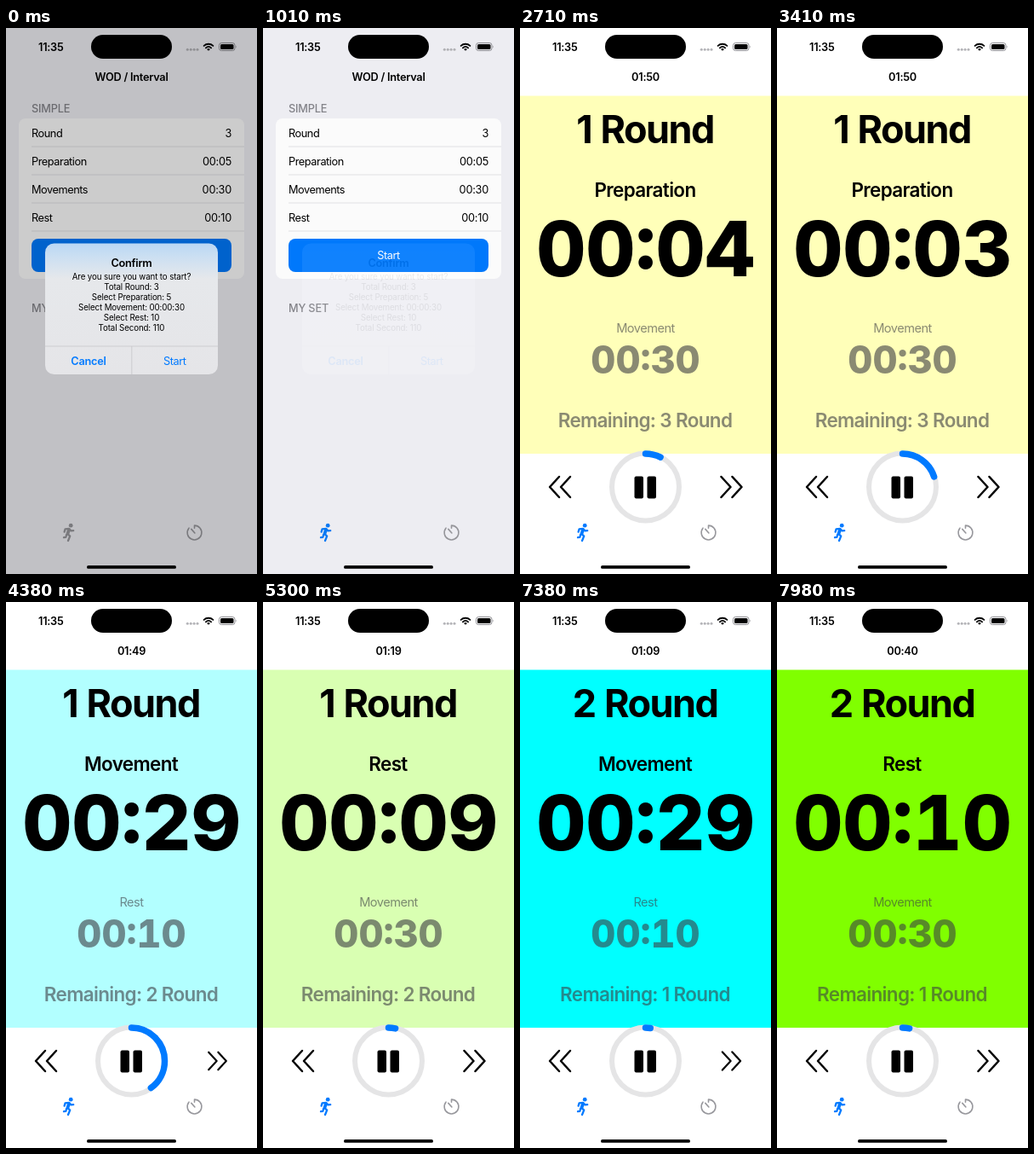
These frames come from a looping animation (295 px wide and 640 px high, 8 s). An HTML page:

```html
<!DOCTYPE html>
<html lang="en">
<head>
<meta charset="utf-8">
<title>Interval timer</title>
<style>
  html, body { margin: 0; width: 100%; height: 100%; overflow: hidden; background: #fff; }
  svg { display: block; width: 295px; height: 640px; }
  text { font-family: Inter, "Open Sans", sans-serif; font-optical-sizing: none; font-size: 12.76px; letter-spacing: -.035em; }
  .mid { text-anchor: middle; }
  .end { text-anchor: end; letter-spacing: -.02em; }
  .bold { font-weight: 600; letter-spacing: -.02em; }
  .head { fill: #85858b; font-weight: 500; letter-spacing: -.015em; }
  .note { font-size: 9.75px; letter-spacing: -.013em; }
  .round { font-size: 45px; font-weight: 700; letter-spacing: -.034em; word-spacing: .03em; }
  .phase { font-size: 22.5px; font-weight: 600; letter-spacing: -.03em; }
  .clock { font-size: 90px; font-weight: 800; letter-spacing: 0; font-variant-numeric: tabular-nums; font-variant-ligatures: no-contextual; }
  .next { font-size: 14.6px; letter-spacing: -.035em; }
  .small { font-size: 45px; }
  .soft { fill: #3c3c43; fill-opacity: .6; }
  .line { fill: none; stroke-linecap: round; stroke-linejoin: round; }
</style>
</head>
<body>
<svg viewBox="0 0 295 640">
  <defs>
    <linearGradient id="glass" x1="0" y1="0" x2="0" y2="1">
      <stop offset="0" stop-color="#b9d7f4"/>
      <stop offset=".1" stop-color="#cbdff2"/>
      <stop offset=".27" stop-color="#e6e8eb"/>
      <stop offset="1" stop-color="#e5e5e8"/>
    </linearGradient>
  </defs>

  <g id="setup">
    <rect width="295" height="640" fill="#f1f1f6"/>
    <text class="mid bold" x="147.5" y="61.5">WOD / Interval</text>
    <text class="head" x="30" y="98.5">SIMPLE</text>
    <rect x="15" y="106" width="265" height="188" rx="8" fill="#fff"/>
    <g id="rows"></g>
    <rect x="30" y="247" width="235" height="39" rx="8" fill="#007aff"/>
    <text class="mid" x="147.5" y="271" fill="#fff">Start</text>
    <text class="head" x="30" y="332.5">MY SET</text>
    <rect id="shade" width="295" height="640" opacity="0"/>
  </g>

  <g id="timer">
    <rect width="295" height="640" fill="#fff"/>
    <rect id="back" y="79.5" width="295" height="419.5"/>
    <text id="total" class="mid bold" x="147.5" y="61.5"></text>
    <text id="round" class="mid round" x="147" y="135"></text>
    <text id="phase" class="mid phase" x="147" y="198"></text>
    <text id="clock" class="mid clock" x="147.5" y="290.5"></text>
    <text id="next" class="mid next soft" x="147.5" y="357"></text>
    <text id="after" class="mid clock small soft" x="147.5" y="405"></text>
    <text id="left" class="mid phase soft" x="147" y="468"></text>
    <circle cx="147.5" cy="538" r="39.5" fill="#fff" stroke="#e5e5e6" stroke-width="6"/>
    <circle id="ring" class="line" cx="147.5" cy="538" r="39" stroke="#007aff" stroke-width="7.5"
            pathLength="360" transform="rotate(-90 147.5 538)"/>
    <rect x="134.5" y="525.5" width="10.5" height="26" rx="2"/>
    <rect x="149.5" y="525.5" width="10.5" height="26" rx="2"/>
    <g class="line" stroke="#000" stroke-width="2.5">
      <path d="M46 526 35 538 46 550M59 526 48 538 59 550"/>
      <path id="skip" d="M-12-12-1 0-12 12M1-12 12 0 1 12"/>
    </g>
  </g>

  <g id="tabs">
    <g id="runner">
      <circle cx="76.2" cy="583.2" r="2.4" stroke="none"/>
      <path class="line" stroke-width="3.8" d="M74 588 72.6 592.4"/>
      <path class="line" stroke-width="2.3" d="M68.6 590.6 69.6 587.4 74 586.8 76.4 589.4 79.2 589.2M72.2 592.8 75.2 595.6 73 601M71.2 593.6 70.4 596.8 68 597.2"/>
    </g>
    <path class="line" stroke="#98989d" stroke-width="1.6" d="M221.5 586.2V583.1A8.4 8.4 0 1 1 215 586.2M221.9 592 217.8 587.4"/>
  </g>

  <g id="status">
    <text class="bold" x="38" y="26.5">11:35</text>
    <g fill="#b4b4b8">
      <circle cx="213.3" cy="25.2" r="1.5"/><circle cx="217.2" cy="25.2" r="1.5"/>
      <circle cx="221.1" cy="25.2" r="1.5"/><circle cx="225" cy="25.2" r="1.5"/>
    </g>
    <path class="line" stroke="#000" stroke-width="1.8" stroke-linecap="butt" d="M232.6 20.9A7.8 7.8 0 0 1 243.4 20.9M234.9 23.3A4.4 4.4 0 0 1 241.1 23.3"/>
    <path d="M238 26.8 236.1 24.9A2.7 2.7 0 0 1 239.9 24.9Z"/>
    <rect x="250.5" y="17.5" width="18.5" height="9" rx="2.8" fill="none" stroke="#8e8e93"/>
    <rect x="252" y="19" width="15.5" height="6" rx="1.5"/>
    <path d="M270.2 20.4Q271.6 22 270.2 23.6Z" fill="#8e8e93"/>
  </g>

  <g id="alert">
    <rect width="295" height="640" opacity=".2"/>
    <rect x="46" y="252.5" width="203" height="153.5" rx="10.5" fill="url(#glass)"/>
    <text class="mid bold" x="147.5" y="280">Confirm</text>
    <g id="notes"></g>
    <path d="M46 373H249M147.8 373V406" stroke="#c6c6ca" stroke-width=".8"/>
    <g fill="#007aff">
      <text class="mid bold" x="97" y="394.5">Cancel</text>
      <text class="mid" x="198.3" y="394.5">Start</text>
    </g>
  </g>

  <rect x="100" y="8" width="95" height="28" rx="14"/>
  <rect x="95" y="630" width="105" height="3.8" rx="1.9"/>
</svg>
<script>
const $ = id => document.getElementById(id);
const LOOP = 8000;

$('rows').innerHTML = [['Round', '3'], ['Preparation', '00:05'], ['Movements', '00:30'], ['Rest', '00:10']]
  .map(([name, value], i) => {
    const y = 127.5 + 33 * i;
    return `<text x="30" y="${y}">${name}</text><text class="end" x="265" y="${y}">${value}</text>` +
      `<path d="M30 ${y + 11.5}H280" stroke="#dedee1" stroke-width=".8"/>`;
  }).join('');

$('notes').innerHTML = ['Are you sure you want to start?', 'Total Round: 3', 'Select Preparation: 5',
  'Select Movement: 00:00:30', 'Select Rest: 10', 'Total Second: 110']
  .map((s, i) => `<text class="mid note" x="147.5" y="${294.8 + 12 * i}">${s}</text>`).join('');

// start, background, total, round, phase, clock, rounds left
const steps = [
  [0, '#ffffb9', '01:50', 1, 'Preparation', '00:05', 3],
  [2300, '#ffffb9', '01:50', 1, 'Preparation', '00:04', 3],
  [3300, '#ffffb9', '01:50', 1, 'Preparation', '00:03', 3],
  [3610, '#b2ffff', '01:50', 1, 'Movement', '00:30', 2],
  [4380, '#b2ffff', '01:49', 1, 'Movement', '00:29', 2],
  [4600, '#d9ffb2', '01:20', 1, 'Rest', '00:10', 2],
  [5300, '#d9ffb2', '01:19', 1, 'Rest', '00:09', 2],
  [6100, '#00ffff', '01:10', 2, 'Movement', '00:30', 1],
  [7060, '#00ffff', '01:09', 2, 'Movement', '00:29', 1],
  [7400, '#80ff00', '00:40', 2, 'Rest', '00:10', 1]
];
// time, degrees
const arc = [[2500, 0], [3010, 72], [3750, 72], [4240, 144], [4380, 144], [4880, 12],
  [5300, 12], [5800, 36], [6010, 36], [6290, 0], [7060, 0], [7560, 12]];
const presses = [[3450, 3700], [4290, 4600], [5990, 6220], [7180, 7440]];

const clamp = x => Math.min(1, Math.max(0, x));
const ease = x => { x = clamp(x); return x * x * (3 - 2 * x); };

function along(keys, t) {
  let value = keys[0][1];
  for (let i = 1; i < keys.length; i++) {
    const [t0, a] = keys[i - 1], [t1, b] = keys[i];
    if (t >= t0) value = a + (b - a) * ease((t - t0) / (t1 - t0));
  }
  return value;
}

// Centres the colon on the height of the digits.
function setClock(id, time) {
  const [min, sec] = time.split(':');
  $(id).innerHTML = `${min}<tspan dy="-.09em">:</tspan><tspan dy=".09em">${sec}</tspan>`;
}

let shown;
function showStep(step) {
  if (step === shown) return;
  shown = step;
  const [, color, total, round, phase, clock, left] = step;
  const toRest = phase === 'Movement';
  $('back').setAttribute('fill', color);
  const words = {
    total, phase,
    round: `${round} Round`,
    next: toRest ? 'Rest' : 'Movement',
    left: `Remaining: ${left} Round`
  };
  for (const id in words) $(id).textContent = words[id];
  setClock('clock', clock);
  setClock('after', toRest ? '00:10' : '00:30');
}

function draw(t) {
  const alert = 1 - ease((t - 680) / 400);
  $('alert').setAttribute('opacity', alert);
  const tint = `color-mix(in srgb, #98989d ${alert * 100}%, #007aff)`;
  $('runner').style.fill = $('runner').style.stroke = tint;

  const k = Math.max(0, t - 1180) * .0129;
  let x = 295 * (1 + k) * Math.exp(-k);
  if (x < .4) x = 0;
  const pushed = 1 - x / 295;
  $('timer').setAttribute('transform', `translate(${x})`);
  $('setup').setAttribute('transform', `translate(${-88 * pushed})`);
  $('shade').setAttribute('opacity', .1 * pushed);

  showStep(steps.filter(s => s[0] <= t).pop());

  const deg = along(arc, t);
  $('ring').setAttribute('stroke-dasharray', `${deg} 400`);
  $('ring').setAttribute('opacity', deg > .3 ? 1 : 0);

  const press = Math.max(...presses.map(([a, b]) => Math.min(ease((t - a) / 80), ease((b - t) / 80))));
  $('skip').setAttribute('transform', `translate(248.5 538) scale(${1 - .14 * press})`);
}

function tick() {
  draw(performance.now() % LOOP);
  requestAnimationFrame(tick);
}
draw(0);
tick();
</script>
</body>
</html>
```
